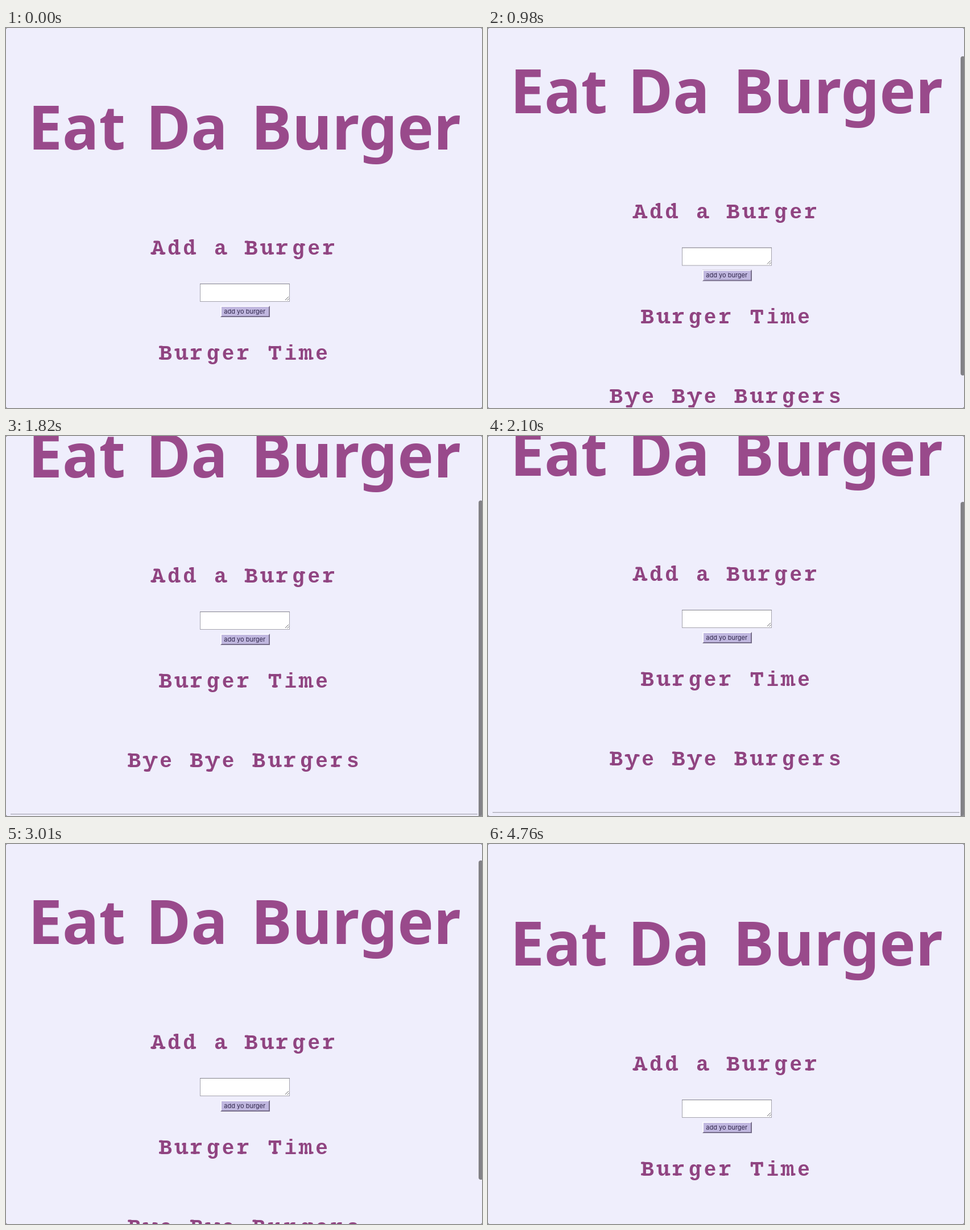
An HTML page with a canvas for the animation above (4830 ms loop, 837 by 669 pixels).

```html
<!DOCTYPE html>
<html lang="en">
<head>
<meta charset="utf-8">
<title>Eat Da Burger</title>
<style>
  html, body { margin: 0; width: 100%; height: 100%; overflow: hidden; background: #efeefc; }
  canvas { display: block; }
</style>
</head>
<body>
<canvas id="stage" width="837" height="669"></canvas>
<script>
const W = 837, H = 669, LOOP = 4830, STEP = 70;
const ctx = document.getElementById('stage').getContext('2d');
const PITCH = 27.4, CENTER = 418;

// Slab serifs per letter: left, right, top above the baseline, optional height.
const SERIFS = {
  A: [[-13, -3, 4], [3, 13, 4], [-8, 2, 24]],
  B: [[-12, -5, 4], [-12, -5, 24]],
  T: [[-5, 5, 4], [-11, -7, 24, 9], [7, 11, 24, 9]],
  a: [[4, 12, 4]],
  d: [[4, 12, 4], [0, 7, 26]],
  g: [[4, 12, 19]],
  m: [[-13, -6, 19], [-13, -6, 4], [-3, 3, 4], [6, 13, 4]],
  r: [[-11, 5, 4], [-11, -4, 19]],
  u: [[-12, -5, 19], [1, 8, 19], [4, 12, 4]],
  y: [[-13, -4, 19], [4, 13, 19], [-11, 0, -4]]
};

const clamp = v => Math.min(1, Math.max(0, v));
const span = (t, from, to) => clamp((t - from) / (to - from));
const smooth = p => p * p * (3 - 2 * p);

function scrollAt(t) {
  if (t < 1610) return 139 * smooth(span(t, 545, 1470));
  if (t < 2170) return 139 + 5 * span(t, 1610, 2100);
  return 144 * (1 - span(t, 2170, 3150) ** 2);
}

function box(x, y, w, h, color, radius = 0) {
  ctx.fillStyle = color;
  ctx.beginPath();
  ctx.roundRect(x, y, w, h, radius);
  ctx.fill();
}

function line(x1, y1, x2, y2, color) {
  ctx.strokeStyle = color;
  ctx.lineWidth = 1;
  ctx.beginPath();
  ctx.moveTo(x1, y1);
  ctx.lineTo(x2, y2);
  ctx.stroke();
}

function titleWord(word, inkLeft) {
  ctx.font = 'bold 107px "Noto Sans", "Open Sans", sans-serif';
  ctx.textAlign = 'left';
  ctx.fillStyle = '#994a8b';
  ctx.fillText(word, inkLeft + ctx.measureText(word).actualBoundingBoxLeft, 213.5);
}

function heading(text, baseline) {
  const color = '#904481';
  ctx.font = 'bold 36px "Liberation Mono", monospace';
  ctx.textAlign = 'center';
  [...text].forEach((letter, i) => {
    const x = CENTER + (i - (text.length - 1) / 2) * PITCH;
    ctx.fillStyle = color;
    ctx.fillText(letter, x, baseline);
    for (const [left, right, top, height = 4] of SERIFS[letter] || [])
      box(x + left, baseline - top, right - left, height, color, 1.5);
  });
}

function form() {
  box(341, 450, 158, 32, '#a5a4ae');
  box(341, 450, 158, 1, '#83828b');
  box(342, 451, 156, 30, '#ffffff');
  line(491, 479, 497, 473, '#68686c');
  line(494.5, 479.5, 497.5, 476.5, '#68686c');

  box(377, 489, 87, 20, '#766d8a');
  ctx.fillStyle = '#f9f8ff';
  ctx.beginPath();
  ctx.moveTo(377, 509);
  ctx.lineTo(377, 489);
  ctx.lineTo(464, 489);
  ctx.lineTo(462, 491);
  ctx.lineTo(379, 507);
  ctx.fill();
  box(379, 491, 83, 16, '#c0b7df');
  ctx.font = '11px Inter, Roboto, sans-serif';
  ctx.textAlign = 'center';
  ctx.fillStyle = '#30264c';
  ctx.fillText('add yo burger', 419.7, 502.5);
}

function page() {
  titleWord('Eat', 48);
  titleWord('Da', 255);
  titleWord('Burger', 440);
  heading('Add a Burger', 398.5);
  form();
  heading('Burger Time', 583.5);
  heading('Bye Bye Burgers', 723.5);
  box(8, 806, 821, 1, '#aaa9b5');
  box(8, 807, 821, 1, '#d9d8e5');
}

function scrollbar(scroll, t) {
  if (t < 630) return;
  ctx.globalAlpha = 1 - span(t, 4130, 4410);
  box(831, scroll * 0.822 - 2.4, 8, 562, '#828186', 4);
  ctx.globalAlpha = 1;
}

function draw(t) {
  const scroll = scrollAt(t);
  box(0, 0, W, H, '#77767d');
  ctx.save();
  ctx.beginPath();
  ctx.roundRect(0, 0, W, H, 3);
  ctx.clip();
  box(0, 0, W, H, '#efeefc');
  ctx.save();
  ctx.translate(0, -Math.round(scroll * 2) / 2);
  page();
  ctx.restore();
  scrollbar(scroll, t);
  ctx.restore();
}

const start = performance.now();
function tick() {
  const t = (performance.now() - start) % LOOP;
  draw(Math.floor(t / STEP) * STEP);
  requestAnimationFrame(tick);
}
tick();
</script>
</body>
</html>
```
